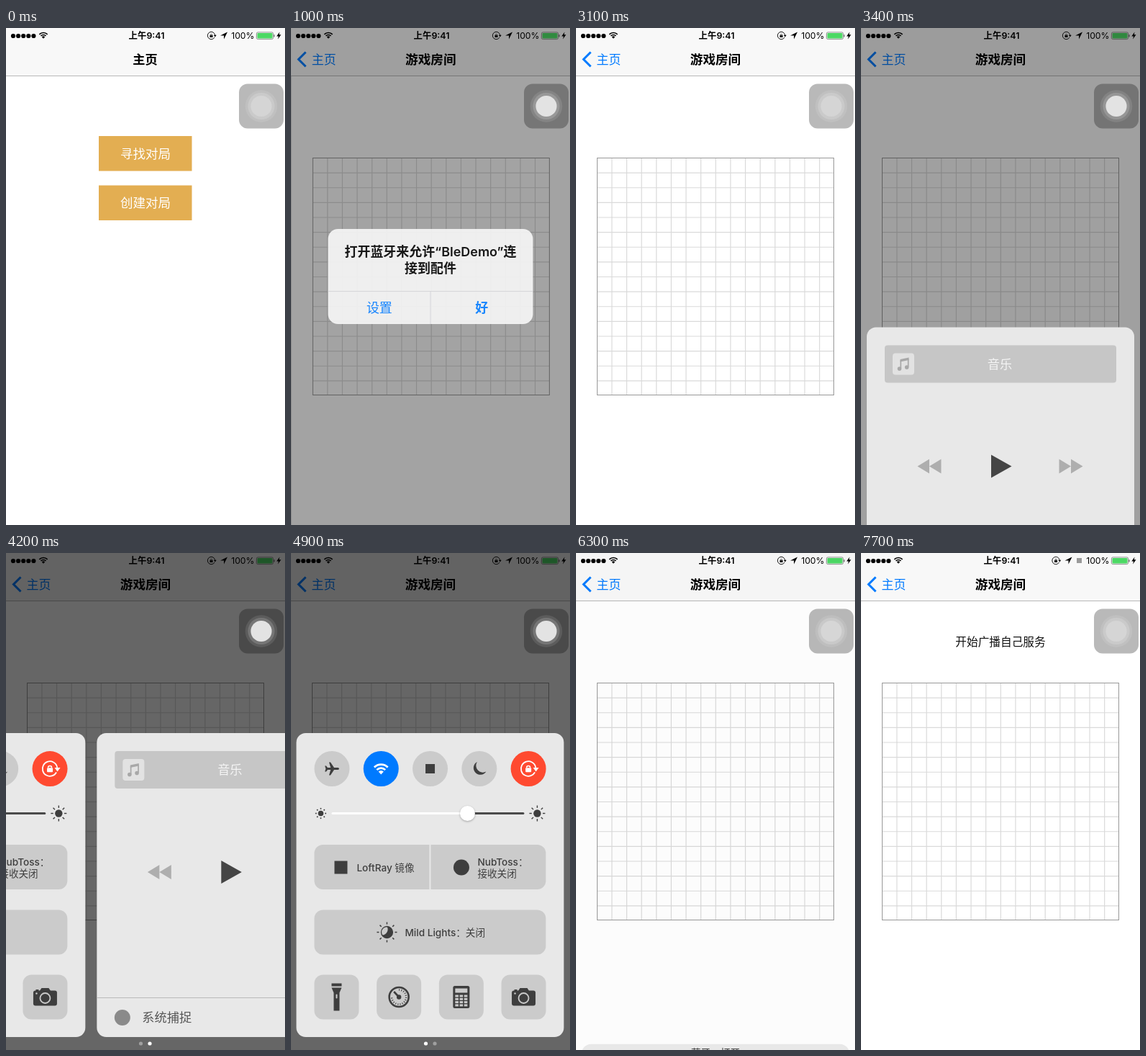
Animation, 388 px wide and 690 px high, one loop 8 s. Source, as an HTML page with a canvas:

```html
<!DOCTYPE html>
<html lang="zh">
<head>
<meta charset="utf-8">
<title>游戏房间</title>
<style>
html, body { margin: 0; width: 100%; height: 100%; overflow: hidden; background: #fff; }
canvas { display: block; width: 388px; height: 690px; }
</style>
</head>
<body>
<canvas id="stage"></canvas>
<script>
const W = 388, H = 690, LOOP = 8, TAU = Math.PI * 2;
const BLUE = '#007aff', INK = '#3e3e3e', PANEL = '#e8e8e8', KEY = '#cbcbcb';
const canvas = document.getElementById('stage');
const c = canvas.getContext('2d');
const ratio = window.devicePixelRatio || 1;
canvas.width = W * ratio;
canvas.height = H * ratio;

// Remaining share of a critically damped move, from 1 down to 0
const damp = (t, w) => t <= 0 ? 1 : (1 + w * t) * Math.exp(-w * t);
const clamp = v => Math.min(1, Math.max(0, v));
const mix = (a, b, p) => a + (b - a) * p;

function at(x, y, draw, scale = 1, alpha = 1) {
  c.save();
  c.translate(x, y);
  c.scale(scale, scale);
  c.globalAlpha *= alpha;
  draw();
  c.restore();
}
function box(x, y, w, h, color, r = 0) {
  c.fillStyle = color;
  c.beginPath();
  c.roundRect(x, y, w, h, r);
  c.fill();
}
function disc(x, y, r, color) {
  c.fillStyle = color;
  c.beginPath();
  c.arc(x, y, r, 0, TAU);
  c.fill();
}
function ring(x, y, r, color, width, from = 0, to = TAU) {
  c.strokeStyle = color;
  c.lineWidth = width;
  c.beginPath();
  c.arc(x, y, r, from, to);
  c.stroke();
}
function line(x1, y1, x2, y2, color, width = 1) {
  c.strokeStyle = color;
  c.lineWidth = width;
  c.beginPath();
  c.moveTo(x1, y1);
  c.lineTo(x2, y2);
  c.stroke();
}
function shape(d, color) {
  c.fillStyle = color;
  c.fill(new Path2D(d));
}
function text(s, x, y, size, color, align = 'center', weight = 400) {
  c.font = `${weight} ${size}px Inter, "Noto Sans CJK SC", "Noto Sans CJK", sans-serif`;
  c.textAlign = align;
  c.fillStyle = color;
  c.fillText(s, x, y + size * .37);
}

// Icons, each centred on the origin
function wifi(color) {
  for (const r of [8.3, 13.3]) ring(0, 7.5, r, color, 2.8, -TAU * 3 / 8, -TAU / 8);
  shape('M0 8L-3.6 4A5 5 0 0 1 3.6 4Z', color);
}
function plane() {
  shape('M10 0C10-1.2 8.6-1.6 7-1.6L3-1.6-2-9-4-9-1.8-1.6-6-1.6-8-4-9.8-4-8.6 0-9.8 4-8 4-6 1.6-1.8 1.6-4 9-2 9 3 1.6 7 1.6C8.6 1.6 10 1.2 10 0Z', INK);
}
function rotationLock(color) {
  ring(0, 0, 10.3, color, 1.8, .5, TAU - .15);
  shape('M6.5-1.5H14.5L10.5 4Z', color);
  box(-4, -1.2, 8, 6, color, 1);
  ring(0, -1.5, 2.5, color, 1.5, Math.PI, TAU);
}
function rays(r1, r2, width) {
  for (let i = 0; i < 8; i++) {
    const x = Math.cos(i * TAU / 8), y = Math.sin(i * TAU / 8);
    line(x * r1, y * r1, x * r2, y * r2, INK, width);
  }
}
function nightSun() {
  ring(0, 0, 8, INK, 1.3);
  shape('M0-8A8 8 0 1 1-7 4A8 8 0 0 0 0-8Z', INK);
  rays(11, 14, 1.5);
}
function torch() {
  shape('M-7-19H7V-15H-7ZM-7-13H7L4-6V19H-4V-6Z', INK);
  box(-1, -4, 2, 6, KEY, 1);
}
function timer() {
  ring(0, 0, 13.5, INK, 2.6);
  c.setLineDash([1, 2.2]);
  ring(0, 0, 10, INK, 2.4, -TAU / 4, TAU / 2);
  c.setLineDash([]);
  disc(0, 0, 3.2, INK);
  line(0, 0, -7, -7.5, INK, 2.6);
}
function calculator() {
  box(-11.5, -15.5, 23, 31, INK, 2.5);
  box(-8.5, -12, 17, 6, KEY);
  for (let i = 0; i < 12; i++) box(-8.5 + i % 3 * 6.2, -3 + Math.floor(i / 3) * 4.3, 4.6, 3, KEY);
}
function camera() {
  shape('M-8-8L-5-12.5H5L8-8Z', INK);
  box(-16.5, -9, 33, 21, INK, 3);
  box(-13, -10.5, 4, 2, INK);
  ring(0, 1.5, 7, KEY, 1.8);
  disc(-12, -5, 1.2, KEY);
}

function statusBar(radioOn) {
  for (let i = 0; i < 5; i++) disc(10 + i * 7.1, 11, 3.1, '#000');
  at(52, 10, () => wifi('#000'), .6);
  text('上午9:41', 195.5, 10.5, 12.4, '#000', 'center', 600);
  at(radioOn ? -14.5 : 0, 0, () => {
    at(285.5, 10.5, () => rotationLock('#000'), .5);
    at(303, 10.5, () => shape('M5-5L-5 0H0V5Z', '#000'));
  });
  if (radioOn) box(300, 7, 7, 7, '#9a9a9a');
  text('100%', 345.5, 10.5, 12.2, '#000', 'right');
  c.strokeStyle = '#777';
  c.lineWidth = .8;
  c.beginPath();
  c.roundRect(348.4, 5.9, 23.2, 9.7, 2);
  c.stroke();
  box(349.5, 7, 21, 7.5, '#4cd964', 1);
  box(372.3, 9, 1.4, 3.6, '#777', .7);
  at(379.5, 10.5, () => shape('M1-5L-3.2 1H-.5L-1.4 5 3-1.2H.3Z', '#000'));
}

function navBar(push, radioOn) {
  box(0, 0, W, 66, '#f8f8f8');
  box(0, 66, W, 1, '#b8b8b8');
  const x = mix(193.5, 45.5, push);
  at(x, 43.5, () => text('主页', 0, 0, 17.2, '#000', 'center', 600), 1, 1 - push);
  at(x, 43.5, () => text('主页', 0, 0, 17, BLUE), 1, push);
  at(mix(330, 194, push), 43.5, () => text('游戏房间', 0, 0, 17.6, '#000', 'center', 600), 1, push);
  at(0, 0, () => {
    c.strokeStyle = BLUE;
    c.lineWidth = 3;
    c.stroke(new Path2D('M20.5 33.5L10.5 43.5 20.5 53.5'));
  }, 1, push);
  statusBar(radioOn);
}

function home() {
  ['寻找对局', '创建对局'].forEach((label, i) => {
    box(129, 150 + i * 68.4, 129.5, 48.5, '#e3ae52');
    text(label, 194, 174.5 + i * 68.4, 17.5, '#fff');
  });
}

function room(message) {
  box(-1, 67, 1, H, '#ddd');
  box(0, 67, W, H, '#fff');
  const cell = 330 / 16;
  for (let i = 1; i < 16; i++) {
    const d = i * cell;
    line(29.3 + d, 180.5, 29.3 + d, 509.5, '#dadada', 1.2);
    line(29.3, 180.5 + d, 358.7, 180.5 + d, '#dadada', 1.2);
  }
  c.strokeStyle = '#999';
  c.lineWidth = 1;
  c.strokeRect(29.5, 180.5, 329, 329);
  if (message) text('开始广播自己服务', 194, 123.5, 15.7, '#111');
}

function alertBox() {
  box(-139.7, -64.7, 279.4, 129.4, '#f8f8f8', 13.5);
  text('打开蓝牙来允许“BleDemo”连', 0, -34, 17.6, '#000', 'center', 600);
  text('接到配件', 0, -11.5, 17.6, '#000', 'center', 600);
  line(-139.7, 20, 139.7, 20, '#d4d4d8');
  line(0, 20, 0, 64.7, '#d4d4d8');
  text('设置', -69.8, 42.5, 17.6, BLUE);
  text('好', 69.8, 42.5, 17.6, BLUE, 'center', 600);
}

function settingsPage(radioOn) {
  box(8, 250, 372, 422, PANEL, 13);
  if (radioOn) text('蓝牙：打开', 194, 262.5, 13.6, INK);
  const toggles = [
    [KEY, plane],
    [BLUE, () => wifi('#fff')],
    [radioOn ? BLUE : KEY, () => box(-6.5, -6.5, 13, 13, radioOn ? '#fff' : INK)],
    [KEY, () => shape('M-3-9.5A9.5 9.5 0 1 0 9.5 4A9.5 9.5 0 0 1-3-9.5Z', INK)],
    ['#ff4a30', () => rotationLock('#fff')]
  ];
  toggles.forEach(([color, icon], i) => {
    const x = 57.5 + i * 68.3;
    disc(x, 299.5, 24.5, color);
    at(x, 299.5, icon);
  });

  at(42, 361.5, () => { disc(0, 0, 3.8, INK); rays(5.8, 7.6, 1.6); });
  at(343, 361.5, () => { disc(0, 0, 5.2, INK); rays(7.6, 11, 1.4); });
  box(57, 360, 189, 3, '#fff', 1.5);
  box(246, 360, 79, 3, '#4a4a4a', 1.5);
  c.save();
  c.shadowColor = 'rgba(0,0,0,.3)';
  c.shadowBlur = 3;
  c.shadowOffsetY = 1;
  disc(246, 361.5, 10.5, '#fff');
  c.restore();

  box(33, 405, 322, 62, KEY, 12);
  box(193, 405, 2, 62, PANEL);
  box(61, 427.5, 18, 18, INK);
  text('LoftRay 镜像', 92, 436.5, 13.6, INK, 'left', 500);
  disc(237.5, 436.5, 11, INK);
  text('NubToss：', 260, 428.5, 13.6, INK, 'left', 500);
  text('接收关闭', 260, 444.5, 13.6, INK, 'left', 500);

  box(33, 495.5, 322, 62, KEY, 12);
  at(134, 526.5, nightSun);
  text('Mild Lights：关闭', 159, 526.5, 13.6, INK, 'left', 500);

  [torch, timer, calculator, camera].forEach((icon, i) => {
    const x = 33 + i * 86.7;
    box(x, 585.5, 62, 62, KEY, 12);
    at(x + 31, 616.5, icon);
  });
}

function musicPage() {
  box(8, 250, 372, 422, PANEL, 13);
  box(33, 275, 322, 52, '#c6c6c6', 4);
  box(44, 286, 30, 30, '#e2e2e2', 4);
  at(59, 301, () => {
    shape('M-4.5-6.5L7.5-9V-5.5L-4.5-3Z', '#a8a8a8');
    line(-3.7, -5, -3.7, 6, '#a8a8a8', 1.7);
    line(6.7, -7, 6.7, 4, '#a8a8a8', 1.7);
    disc(-5.5, 6.5, 2.8, '#a8a8a8');
    disc(4.7, 4.5, 2.8, '#a8a8a8');
  });
  text('音乐', 193, 301, 17.2, '#f4f4f4');
  const skip = 'M-16.5 0L0-10V10ZM0 0L16.5-10V10Z';
  at(95, 443, () => shape(skip, '#aeaeae'));
  at(292, 443, () => { c.rotate(Math.PI); shape(skip, '#aeaeae'); });
  at(181, 443, () => shape('M0-16L28.5 0 0 16Z', '#454545'));
  box(8, 617, 372, 1, '#b9b9b9');
  disc(43.5, 645, 11, '#8a8a8a');
  text('系统捕捉', 71, 644.5, 17.2, '#555', 'left');
}

function controlPanel(drop, scroll, radioOn) {
  at(0, drop, () => {
    at(-scroll, 0, () => settingsPage(radioOn));
    at(W - scroll, 0, musicPage);
    const first = scroll < W / 2;
    disc(187.5, 681, 2.6, first ? '#fff' : '#a0a0a0');
    disc(200, 681, 2.6, first ? '#a0a0a0' : '#fff');
  });
}

function floatingButton(dim) {
  box(324, 77.5, 62, 62, 'rgba(0,0,0,.275)', 12);
  disc(355, 108.5, 22.3, 'rgba(255,255,255,.1)');
  disc(355, 108.5, 18.6, 'rgba(255,255,255,.16)');
  const v = Math.round(213 + 14 * clamp(dim / .3));
  disc(355, 108.5, 14.6, `rgb(${v},${v},${v})`);
}

function render(t) {
  const push = 1 - damp(t - .55, 18.5);
  const alertIn = 1 - damp(t - .78, 17.7);
  const alertAlpha = alertIn * (1 - clamp((t - 2.4) / .35));
  const panelOpen = t > 3.25 && t < 6.35;
  const closed = t < 5.9 ? damp(t - 3.25, 14) : 1 - damp(t - 5.932, 16);
  const scroll = W * damp(t - 4.1, 11);
  const dim = panelOpen ? .6 * (1 - closed) : .4 * alertAlpha;
  const radioInBar = t >= 6.5;

  c.setTransform(ratio, 0, 0, ratio, 0, 0);
  box(0, 0, W, H, '#fff');
  at(-.3 * W * push, 0, home);
  if (push > 0) at(W * (1 - push), 0, () => room(radioInBar));
  navBar(push, radioInBar);
  box(0, 0, W, H, `rgba(0,0,0,${dim})`);
  floatingButton(dim);
  if (alertAlpha > 0) at(194, 345, alertBox, 1.2 - .2 * alertIn, alertAlpha);
  if (panelOpen) controlPanel(440 * closed, scroll, t >= 5.3);
}

function tick() {
  render(performance.now() / 1000 % LOOP);
  requestAnimationFrame(tick);
}
tick();
</script>
</body>
</html>
```
